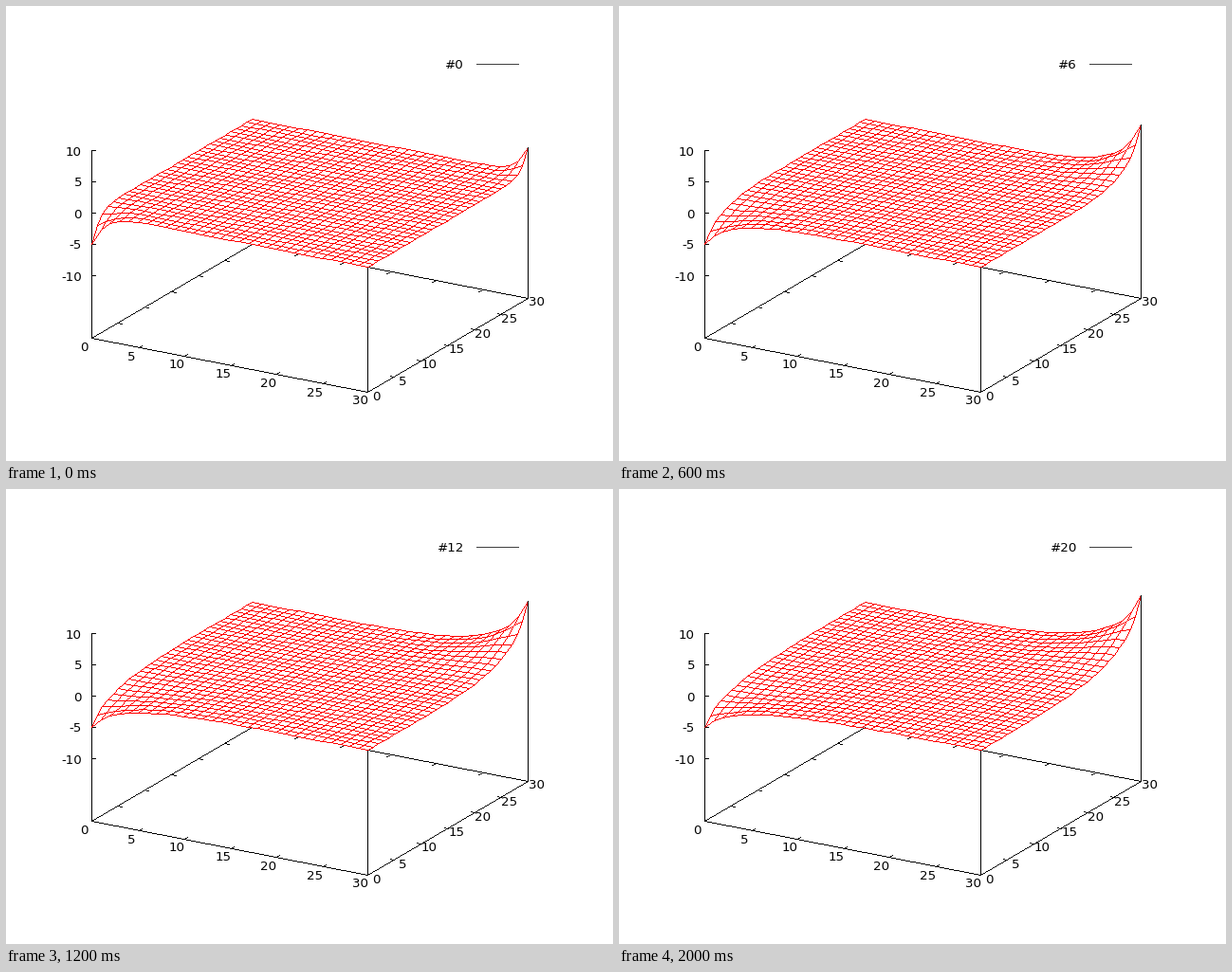
A matplotlib script for the animation above (2100 ms loop, 640 by 480 pixels).

```python
import numpy as np
import matplotlib.pyplot as plt
from matplotlib.animation import FuncAnimation

W, H, DPI = 640, 480, 100
FRAMES, STEP_MS = 21, 100
N = 31                          # grid points per side
FONT_PX = 13.33
BLACK, RED, GREY = (0, 0, 0), (255, 0, 0), (64, 64, 64)
SINK, FLOW, DT = -5.0, 5.55, 0.2

plt.rcParams["font.family"] = "DejaVu Sans"


def project(x, y, z):
    """Grid coordinates to whole stage pixels."""
    p = np.stack([90 + (291 * x + 169 * y) / 30,
                  218 + (57 * x - 99 * y) / 30 - 6.6 * z], axis=-1)
    return np.floor(p + 0.5).astype(int)


def relax():
    """Heat spreading from a fed corner, with the opposite corner held."""
    u = np.zeros((N, N))        # indexed [y, x]
    u[0, 0] = SINK
    states = []
    for k in range(FRAMES):
        for _ in range(13 if k else 11):
            p = np.pad(u, 1, mode="edge")
            flux = p[2:, 1:-1] + p[:-2, 1:-1] + p[1:-1, 2:] + p[1:-1, :-2] - 4 * u
            flux[-1, -1] += FLOW
            u = u + DT * flux
            u[0, 0] = SINK
        states.append(u)
    return states


def lines(canvas, a, b, color=BLACK):
    """Crisp one-pixel lines from points a to points b."""
    a, d = np.asarray(a), np.subtract(b, a)
    n = np.abs(d).max(axis=-1)[..., None]
    t = np.minimum(np.arange(n.max() + 1), n) / np.maximum(n, 1)
    p = np.floor(a[..., None, :] + d[..., None, :] * t[..., None] + 0.5).astype(int)
    canvas[p[..., 1], p[..., 0]] = color


def draw_box():
    canvas = np.full((H, W, 3), 255, np.uint8)
    c00, c30, c33, c03 = (project(x, y, -20)
                          for x, y in [(0, 0), (30, 0), (30, 30), (0, 30)])
    corner = project(30, 0, 0)
    for a, b in [(c00, c03), (corner, c33), (c00, c30), (c30, c33),
                 (c00, project(0, 0, 10)), (c30, corner)]:
        lines(canvas, a, b)

    for v in range(5, 30, 5):
        for x, y, tick in [(v, 0, (4, -2)), (v, 30, (-4, 2)),
                           (0, v, (4, 1)), (30, v, (-4, -1))]:
            p = project(x, y, -20)
            lines(canvas, p, p + tick)
    for v in range(-10, 11, 5):
        p = project(0, 0, v)
        lines(canvas, p, p + (4, 0))

    lines(canvas, (496, 61), (540, 61), GREY)
    return canvas


def label(x, y, s, ha="center"):
    return ax.text(x, y + 5, s, fontsize=FONT_PX * 72 / DPI, ha=ha, va="baseline")


def draw_labels():
    for v in range(0, 31, 5):
        x, y = project(v, 0, -20)
        label(x - 7.2, y + 8.5, str(v))
        x, y = project(30, v, -20)
        label(x + 9, y + 3.5, str(v))
    for v in range(-10, 11, 5):
        label(80, project(0, 0, v)[1] + 0.5, str(v), "right")


STATES = relax()
GX, GY = np.meshgrid(np.arange(N), np.arange(N))
BOX = draw_box()

fig = plt.figure(figsize=(W / DPI, H / DPI), dpi=DPI, facecolor="white")
ax = fig.add_axes([0, 0, 1, 1])
stage = ax.imshow(BOX, extent=(0, W, H, 0), interpolation="nearest", aspect="auto")
ax.axis("off")
draw_labels()
title = label(483, 61.5, "", "right")


def update(k):
    canvas = BOX.copy()
    p = project(GX, GY, STATES[k])
    lines(canvas, p[:, :-1], p[:, 1:], RED)
    lines(canvas, p[:-1], p[1:], RED)
    lines(canvas, project(30, 30, -20), p[-1, -1])
    stage.set_data(canvas)
    title.set_text(f"#{k}")
    return stage, title


anim = FuncAnimation(fig, update, frames=FRAMES, interval=STEP_MS,
                     repeat=True, repeat_delay=0, blit=False)
plt.show()
```
